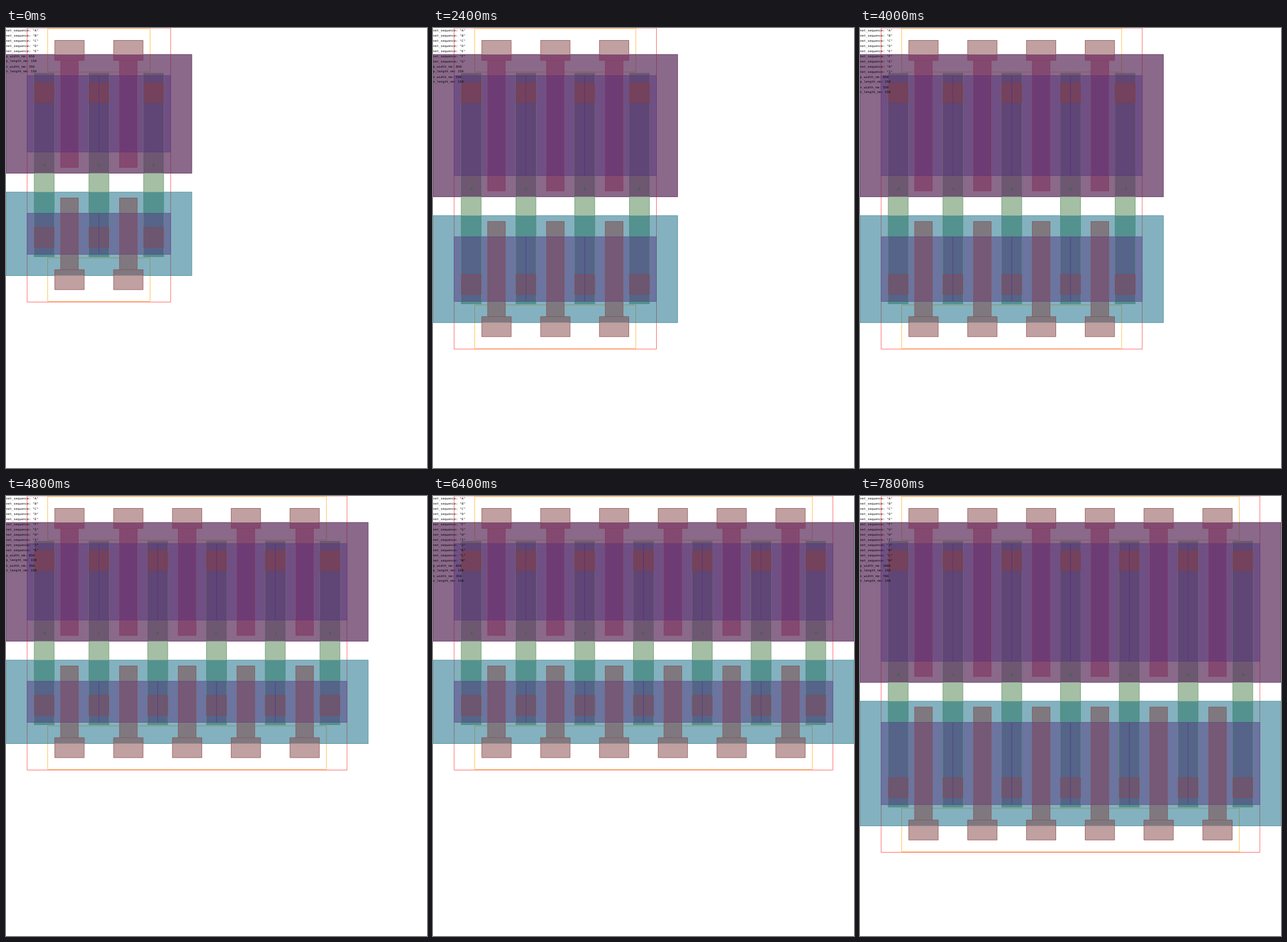
Write a matplotlib script that moves like this. It is 732 px wide and 765 px high and loops after 8 s.

```python
import numpy as np
import matplotlib.pyplot as plt
from matplotlib.animation import FuncAnimation
from matplotlib.patches import Rectangle

W, H, DPI = 732, 765, 100
SCALE = 732 / 3580          # pixels per nanometre
PX = 72 / DPI               # points per pixel
PITCH = 500
LENGTH = 150
SWEEP = 8                   # width steps for each gate count

plt.rcParams["text.hinting"] = "none"
fig = plt.figure(figsize=(W / DPI, H / DPI), dpi=DPI, facecolor="white")
ax = fig.add_axes([0, 0, 1, 1])

GREEN, GATE = "#a4bfa4", "#c0a0a0"
# Colours of each layer where it crosses the upper and lower wells
UPPER = dict(well="#8b6a8a", diff="#705084", metal="#6d5771", gate="#844970",
             metal_diff="#5f4676", gate_diff="#6e3c75", contact="#74425c",
             well_edge="#6a3a68", diff_edge="#573080", metal_edge="#5a4a66",
             gate_edge="#7c2f60", contact_edge="#7c4050")
LOWER = dict(well="#85b2c0", diff="#6c74a0", metal="#54928f", gate="#80787f",
             metal_diff="#556488", gate_diff="#755976", contact="#6d5670",
             well_edge="#4a929f", diff_edge="#4f3f88", metal_edge="#3f857c",
             gate_edge="#7a5058", contact_edge="#834a5c")


def rgb(code):
    return np.array([int(code[i:i + 2], 16) for i in (1, 3, 5)]) / 255


def rect(x0, y0, x1, y1, face="none", edge="none", lw=0.9):
    ax.add_patch(Rectangle((x0 * SCALE, y0 * SCALE), (x1 - x0) * SCALE,
                           (y1 - y0) * SCALE, facecolor=face, edgecolor=edge,
                           linewidth=lw * PX, joinstyle="miter", snap=False))


def glass(x0, y0, x1, y1, tone, edge, alpha):
    """Translucent box that shows as `tone` over white."""
    base = (rgb(tone) - (1 - alpha)) / alpha
    rect(x0, y0, x1, y1, (*np.clip(base, 0, 1), alpha), edge)


def label(x, y, s, size, color, ha="left"):
    ax.text(x, y, s, family="DejaVu Sans Mono", fontsize=size * PX,
            color=color, ha=ha, va="baseline")


def strip(x0, x1, y0, y1, kind, plain, plain_edge, wells):
    """Vertical bar, recoloured where it crosses wells and diffusions."""
    rect(x0, y0, x1, y1, plain, plain_edge)
    for top, bottom, tone in wells:
        for grow, name in ((180, kind), (0, kind + "_diff")):
            a, b = max(y0, top - grow), min(y1, bottom + grow)
            if a < b:
                rect(x0, a, x1, b, tone[name])
        a, b = max(y0, top - 180), min(y1, bottom + 180)
        if a < b:
            for x in (x0, x1):
                rect(x, a, x, b, edge=tone[kind + "_edge"], lw=0.5)
            for y in (y0, y1):
                if a <= y <= b:
                    rect(x0, y, x1, y, edge=tone[kind + "_edge"], lw=0.5)


def draw(i):
    ax.clear()
    ax.set_xlim(0, W)
    ax.set_ylim(H, 0)
    ax.axis("off")

    gates = 2 + i // SWEEP
    p_width = 650 + 50 * (i % SWEEP)
    n_width = p_width - 300
    right = 400 + PITCH * gates
    p0, p1 = 405, 405 + p_width
    n0 = p1 + 520
    n1 = n0 + n_width
    wells = ((p0, p1, UPPER), (n0, n1, LOWER))

    rect(180, 0, right, n1 + 405, edge=(1, 0, 0, 0.65))
    for y in (5, n1 + 30):
        rect(355, y, right - 175, y + 370, edge=(1, 0.65, 0, 0.75))

    for top, bottom, tone in wells:
        glass(0, top - 180, right + 180, bottom + 180, tone["well"],
              tone["well_edge"], 0.7 if tone is UPPER else 0.5)
        rect(180, top, right, bottom, tone["diff"])

    metals = ([240] + [705 + PITCH * k for k in range(gates - 1)]
              + [right - 230])
    for x in metals:
        strip(x, x + 170, 385, n1 + 20, "metal", GREEN, "#6f9c74", wells)
        for y, tone in ((p0 + 60, UPPER), (n1 - 230, LOWER)):
            rect(x, y, x + 170, y + 170, tone["contact"],
                 tone["contact_edge"], 0.7)

    for k in range(gates):
        x = 465 + PITCH * k
        for head, y0, y1 in ((105, 275, p1 + 130),
                             (n1 + 130, n0 - 130, n1 + 130)):
            strip(x, x + LENGTH, y0, y1, "gate", GATE, "#985c5c", wells)
            strip(x - 50, x + LENGTH + 50, head, head + 170, "gate", GATE,
                  "#985c5c", wells)

    # Cell borders stay visible across the bars
    cuts = [180] + [790 + PITCH * k for k in range(gates - 1)] + [right]
    for top, bottom, tone in wells:
        for a, b in zip(cuts, cuts[1:]):
            rect(a, top, b, bottom, edge=(*rgb(tone["diff_edge"]), 0.7),
                 lw=0.8)

    for k, x in enumerate(metals):
        label((x + 85) * SCALE, (385 + n1 + 20) / 2 * SCALE + 3.1,
              chr(65 + 2 * k), 6.5, "#107a18", "center")

    lines = [f'net_sequence: "{chr(65 + k)}"' for k in range(2 * gates + 1)]
    lines += [f"p_width_nm: {p_width}", f"p_length_nm: {LENGTH}",
              f"n_width_nm: {n_width}", f"n_length_nm: {LENGTH}"]
    for k, line in enumerate(lines):
        label(0, 6 + 9 * k, line, 5.45, "black")
    return []


anim = FuncAnimation(fig, draw, frames=5 * SWEEP, interval=200,
                     init_func=lambda: draw(0), repeat=True, repeat_delay=0,
                     blit=False)
plt.show()
```
